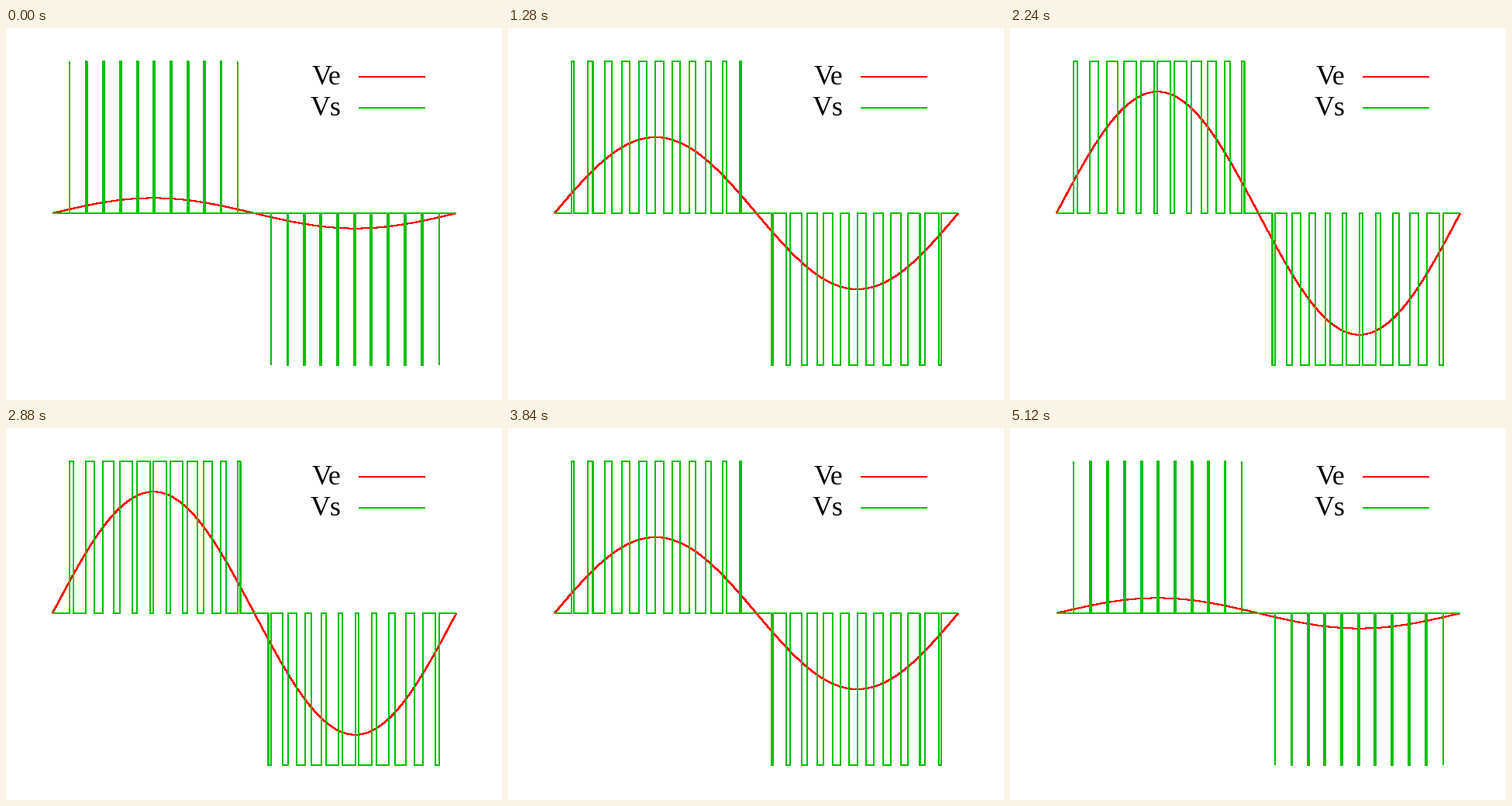
These frames come from a looping animation (640 by 480 pixels, 5.44 s). A matplotlib script:

```python
import numpy as np
import matplotlib.pyplot as plt
from matplotlib.animation import FuncAnimation

W, H, DPI = 640, 480, 80
FRAMES, INTERVAL = 17, 320
LEFT, SPAN = 60, 521
MID, HALF = 239, 196
CARRIER = 24
RED, GREEN = "#ff0000", "#00c000"

plt.rcParams["path.simplify"] = False

t = np.linspace(0, 1, 10000)
saw = (CARRIER * t) % 1


def to_pixels(v):
    """Map a signal to whole-pixel points, dropping repeated ones."""
    x = np.floor(LEFT + SPAN * t + 0.5)
    y = np.floor(MID - HALF * v + 0.5)
    keep = np.r_[True, (np.diff(x) != 0) | (np.diff(y) != 0)]
    return x[keep], y[keep]


def signals(k):
    amp = (9 - abs(k - 8)) / 10
    ve = amp * np.sin(2 * np.pi * t)
    high = (ve > 0) & (ve > saw)
    low = (ve < 0) & (ve < saw - 1)
    return ve, high.astype(float) - low


fig = plt.figure(figsize=(W / DPI, H / DPI), dpi=DPI, facecolor="white")
ax = fig.add_axes([0, 0, 1, 1])
ax.set_xlim(0, W)
ax.set_ylim(H, 0)
ax.axis("off")


def stroke(x, y, color, join="miter"):
    return ax.plot(x, y, color=color, lw=2 * 72 / DPI, antialiased=False,
                   snap=False, solid_capstyle="butt",
                   solid_joinstyle=join)[0]


for name, y, color in (("Ve", 63, RED), ("Vs", 103, GREEN)):
    stroke([455, 541], [y, y], color)
    ax.text(432.5, y + 10, name, family="Liberation Serif",
            size=36 * 72 / DPI, ha="right", va="baseline", color="black")

ve_line = stroke([], [], RED, "bevel")
vs_line = stroke([], [], GREEN)


def update(k):
    ve, vs = signals(k)
    ve_line.set_data(*to_pixels(ve))
    vs_line.set_data(*to_pixels(vs))
    return ve_line, vs_line


anim = FuncAnimation(fig, update, frames=FRAMES, interval=INTERVAL,
                     repeat=True, repeat_delay=0)
plt.show()
```
